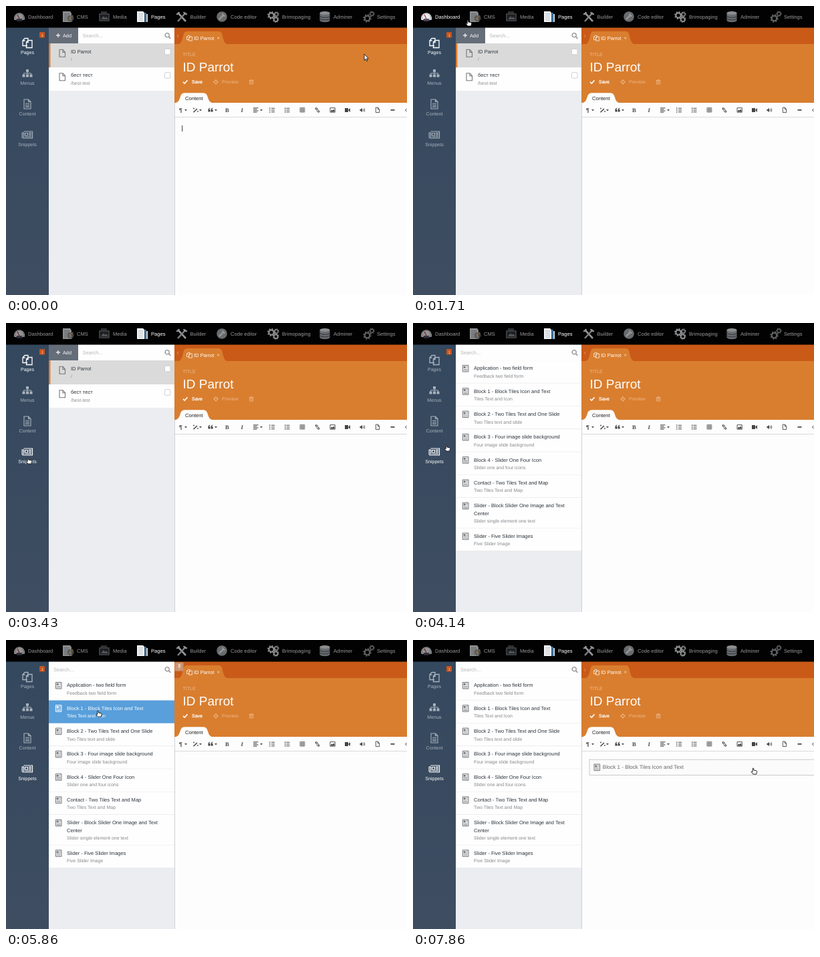
These frames come from a looping animation (600x433 px, 8000 ms). An HTML page:

```html
<!DOCTYPE html>
<html lang="en">
<head>
<meta charset="utf-8">
<title>Page editor</title>
<style>
html, body { margin: 0; width: 100%; height: 100%; overflow: hidden; background: #fdfdfd; }
svg { display: block; width: 100%; height: 100%; }
text { font-family: "Liberation Sans", Arial, sans-serif; text-rendering: geometricPrecision; white-space: pre; }
.serif { font-family: "Liberation Serif", serif; font-weight: bold; }
</style>
</head>
<body>
<svg id="stage" viewBox="0 0 600 433"></svg>
<script>
const stage = document.getElementById('stage');
const LOOP = 8000, STEPS = 7; // picture steps per second

const rect = (x, y, w, h, fill, more = '') =>
  `<rect x="${x}" y="${y}" width="${w}" height="${h}" fill="${fill}" ${more}/>`;
const text = (x, y, size, fill, s, more = '') =>
  `<text x="${x}" y="${y}" font-size="${size}" fill="${fill}" ${more}>${s}</text>`;
const line = (d, color = 'currentColor', w = 1, more = '') =>
  `<path d="${d}" fill="none" stroke="${color}" stroke-width="${w}" ${more}/>`;
const shape = (d, fill = 'currentColor', more = '') => `<path d="${d}" fill="${fill}" ${more}/>`;
const disc = (x, y, r, fill, more = '') => `<circle cx="${x}" cy="${y}" r="${r}" fill="${fill}" ${more}/>`;
const at = (x, y, body, more = '', scale = 1) =>
  `<g transform="translate(${x} ${y}) scale(${scale})" ${more}>${body}</g>`;

const gear = (x, y, r, color) => at(x, y,
  disc(0, 0, r * .62, 'none', `stroke="${color}" stroke-width="${r * .36}"`) +
  disc(0, 0, r * .88, 'none', `stroke="${color}" stroke-width="${r * .3}" stroke-dasharray="${r * .345}"`));
const page = (x, y, w, h, color, lw = 1) =>
  at(x, y, line(`M0 0H${w * .6}L${w} ${h * .35}V${h}H0ZM${w * .58} 0V${h * .37}H${w}`, color, lw));
const news = color => line('M-4.3-4.8H4.3V4.8H-4.3Z', color, 1) +
  shape('M-3-3.4H0V-.4H-3ZM1-3.4H3V-2.6H1ZM1-1.5H3V-.7H1ZM-3 .7H3V1.5H-3ZM-3 2.6H3V3.4H-3Z', color);
const lens = (x, y) => at(x, y, disc(-.8, -.8, 3.1, 'none', 'stroke="#8b8f95" stroke-width="1.3"') + line('M1.5 1.5L4.3 4.3', '#8b8f95', 1.6));

// Top menu: label, label x, icon x, icon
const menu = [
  ['Dashboard', 33, 20, shape('M-7.5 5A8 8 0 1 1 7.5 5Z', '#e9edf0') +
    disc(0, 1, 6.2, 'none', 'stroke="#667" stroke-width="1.6" stroke-dasharray=".8 1.6"') + line('M0 3L-3-3', '#c33', 1.2) + shape('M-4 3H4V6H-4Z', '#556')],
  ['CMS', 106, 93, shape('M-8-8H3L5-5V8H-8Z', '#dfe3e6') + line('M-6-4H2M-6-1H2M-6 2H1M-6 5H0', '#8b959c') +
    gear(3.5, 2.5, 5, '#7f8a92') + line('M0 6L7-2', '#d09a52', 1.8)],
  ['Media', 160, 147, rect(-8, -5, 16, 12, '#5c5f63', 'rx="1"') + rect(-5, -8, 9, 3, '#484b4f') +
    rect(-6, -3, 12, 8, '#2d3035') + shape('M-5 4L-1-1L1 2L3 0L6 4Z', '#83888d')],
  ['Pages', 217, 204, shape('M-8-8H1L3-6V8H-8Z', '#f4f6f8') + line('M-6-4H1M-6-1H1M-6 2H1M-6 5H1', '#aab4bc') +
    rect(3.5, -6, 2, 14, '#4b8fc9') + rect(6, -4, 2, 12, '#cfd8df')],
  ['Builder', 275.5, 263, line('M-6-6L6 7', '#eef0f2', 2.6) + line('M6-6L-6 7', '#c9ced3', 2.4) +
    line('M-8-4Q-5-3-4-7M3-7Q4-3 8-4', '#eef0f2', 2)],
  ['Code editor', 336, 323, disc(0, 0, 7.8, '#a9adb1') + line('M-4 4L3-3', '#f5f5f5', 2.4) + line('M1-5Q1-1 5-1', '#f5f5f5', 1.7)],
  ['Brimopaging', 413, 400, gear(-3, -2, 5.8, '#e8eaec') + gear(4.6, -3.6, 4, '#d5d9dc') + gear(3.7, 4.2, 4.6, '#e8eaec')],
  ['Adminer', 490, 477, shape('M-7.5-5.5V5.5A7.5 2.8 0 0 0 7.5 5.5V-5.5Z', '#a9afb5') +
    '<ellipse cy="-5.5" rx="7.5" ry="2.6" fill="#e2e5e8"/>' + line('M-7.5-1.5A7.5 2.8 0 0 0 7.5-1.5M-7.5 2A7.5 2.8 0 0 0 7.5 2', '#555c63', 1.1)],
  ['Settings', 555, 543, gear(-2.5, 2.5, 6, '#9a9da0') + gear(4.4, -4.2, 4.1, '#9a9da0')],
];
const menuEdges = menu.slice(1).map(m => m[2] - 9);

const sideItems = [
  ['Pages', line('M-3.5-3H-7V4.5H0M-7-3L-4-6.5H1V-3M-1.5-1L1-3.5H7V7.5H-1.5ZM1-3.5V-.5H-1.5', 'currentColor', 1.3)],
  ['Menus', shape('M-2-6H2V-2H-2ZM-7.5 1.5H-3.5V5.5H-7.5ZM-2 1.5H2V5.5H-2ZM3.5 1.5H7.5V5.5H3.5Z') + line('M0-2V1.5M-5.5 1.5V-.2H5.5V1.5')],
  ['Content', line('M-5-7H1.5L5-3.5V7H-5ZM1.5-7V-3.5H5M-3-.7H3M-3 1.7H3M-3 4.1H3', 'currentColor', 1.1)],
  ['Snippets', line('M-5.5-5H7.5V5H-6.5Q-7.8 5-7.8 3.5V-3H-5.5V4', 'currentColor', 1.2) +
    line('M-3.5-2.5H.5V1H-3.5ZM2-2.6H6M2-.8H6M2 1H6M-3.5 3H6', 'currentColor', 1.1)],
];

const snippets = [
  ['Application - two field form', 'Feedback two field form'],
  ['Block 1 - Block Tiles Icon and Text', 'Tiles Text and Icon'],
  ['Block 2 - Two Tiles Text and One Slide', 'Two Tiles text and slide'],
  ['Block 3 - Four image slide background', 'Four image slide background'],
  ['Block 4 - Slider One Four Icon', 'Slider one and four icons'],
  ['Contact - Two Tiles Text and Map', 'Two Tiles Text and Map'],
  ['Slider - Block Slider One Image and Text|Center', 'Slider single element one text'],
  ['Slider - Five Slider Images', 'Five Slider Image'],
];
let rowTop = 56.2;
const rows = snippets.map(([title, sub]) => {
  const lines = title.split('|'), y = rowTop, h = 34.3 + (lines.length - 1) * 11.3;
  rowTop += h;
  return { lines, sub, y, h };
});

const drawMenu = () => rect(0, 0, 600, 32.5, '#020202') + menu.map(([label, x, ix, icon]) =>
  `<g class="menu">${at(ix, 16, icon)}${text(x, 18.8, 7.6, 'currentColor', label)}</g>`).join('');

const drawSide = () => rect(0, 32, 64, 401, 'url(#side)') + sideItems.map(([label, icon], i) =>
  `<g class="side">${at(32, 55 + 46 * i, icon)}${text(32, 71.7 + 46 * i, 7.1, 'currentColor', label, 'text-anchor="middle"')}</g>`).join('') +
  rect(50, 39, 8, 8.6, '#c9541d', 'rx="1"') + text(52.6, 45.6, 6, '#f6d5c4', '1');

const pageRow = (y, title, path) => page(80, y + 9, 8.5, 11, '#777', 1.1) +
  text(97, y + 14.4, 7.6, '#2c333b', title) + text(97, y + 26, 7, '#8f8f8f', path) +
  rect(237.5, y + 8, 8.5, 8.5, '#fff', 'rx="1" stroke="#c4c6c8" stroke-width=".8"');

const drawPages = () => '<g id="pages">' +
  rect(64, 32, 44, 24, '#656d79') + line('M75 44H81M78 41V47', '#e6e8ea', 1.4) + text(85, 47, 7.3, '#fff', 'Add') +
  text(114.5, 46.8, 7.6, '#b4b6b9', 'Search...') +
  rect(64, 56, 188, 36, '#dadada') + rect(64, 56, 2.4, 36, '#e07b2c') + rect(64, 92, 188, 35, '#fefefe') +
  pageRow(56.3, 'ID Parrot', '/') + pageRow(91.7, 'бест тест', '/best-test') + '</g>';

const drawRow = ({ lines, sub, y, h }) => '<g class="row">' +
  rect(64, y, 188, h, '#fefefe') + rect(64, y + h - .7, 188, .7, '#e6e7e9', 'class="rule"') +
  rect(64, y, 188, h, '#589fdb', 'class="glow"') +
  at(78.7, y + 12, news('currentColor'), 'class="mark"') +
  `<g class="title">${lines.map((s, i) => text(91, y + 14.2 + i * 11.3, 7.55, 'currentColor', s)).join('')}</g>` +
  `<g class="sub">${text(91, y + h - 8.6, 7, 'currentColor', sub)}</g></g>`;

const drawSnippets = () => '<g id="snippets">' + text(71, 46.8, 7.6, '#b4b6b9', 'Search...') + rows.map(drawRow).join('') + '</g>';

const drawHeader = () => rect(252, 32, 348, 25.3, '#c95a18') + rect(252, 57, 348, 88, '#d97e2f') +
  shape('M257 57.5Q262 57 264 49L265.5 43Q266.5 38 271 38H318Q322.5 38 323.5 43L325 49Q327 57 332 57.5Z', '#d97e2f') +
  line('M258 43L256.5 45L258 47', '#e09a6a', .9) + at(274.5, 48, sideItems[0][1], 'color="#fff"', .56) +
  text(281, 50.8, 7.6, '#fff', 'ID Parrot') + disc(317.7, 48, 1.8, '#e7ab78') +
  text(264.5, 75.3, 7, '#eebd91', 'TITLE') + text(264.5, 97.8, 19, '#fff', 'ID Parrot') +
  line('M265 113.8L267.3 116L271.5 111.3', '#fff', 1.6) + text(278, 116.3, 7, '#fff', 'Save', 'stroke="#fff" stroke-width=".25"') +
  disc(314, 113.8, 2.4, 'none', 'stroke="#edb788" stroke-width="1"') +
  line('M314 110V112.5M314 115V117.6M310.2 113.8H312.7M315.3 113.8H317.8', '#edb788', 1) +
  text(323, 116.3, 7, '#edb788', 'Preview') +
  line('M364.5 112H369.8V117H364.5ZM363.6 111.6H370.6M366 110.5H368.3M366.3 113V116M368 113V116', '#edb788', .8);

const arrow = x => shape(`M${x - 2} 155H${x + 2}L${x} 157.2Z`, ink);
const bars = (x, w) => `M${x} 153.2h${w}M${x} 156h${w}M${x} 158.8h${w}`;
const ink = '#444';
const drawToolbar = () => rect(252.9, 145, 348, 21, '#fdfdfd') + rect(252.9, 166, 348, 1, '#d9dadc') +
  shape('M253 145.2Q258.5 144.5 260.3 137.5Q261.8 130.2 267 130.2H295.5Q300.5 130.2 302.2 137.5Q304 144.5 309 145.2Z', '#fdfdfd') +
  text(268, 141.3, 7.6, '#222', 'Content') +
  text(259, 158.8, 8.5, ink, '¶', 'font-weight="bold"') +
  line('M280.5 159.3L286 154', ink, 1.5) + line('M281 152.4V154.6M280 153.5H282M287 157V159M286 158H288', ink, .8) +
  shape('M302.5 156Q302.5 153 305.3 152.5V153.6Q304 154 304.1 155.2H305.5V158.5H302.5ZM306.6 156Q306.6 153 309.4 152.5V153.6Q308.1 154 308.2 155.2H309.6V158.5H306.6Z', ink) +
  [269, 291, 314, 382].map(arrow).join('') +
  text(328, 159, 8.5, ink, 'B', 'class="serif"') + text(351.5, 159, 8.5, ink, 'I', 'class="serif" font-style="italic"') +
  line('M370 152.8H377.5M370 154.9H375.5M370 157H377.5M370 159.1H375.5', ink, 1) +
  line(bars(397, 5), ink, 1.1) + line('M394.8 152V154.4M394.8 155V157M394.8 157.8V160', ink, .9) +
  line(bars(419.5, 5), ink, 1.1) + line(bars(417, 1.4), ink, 1.4) +
  line('M440 152.5H446.8V159H440ZM440 154.7H446.8M440 156.9H446.8M442.3 153V159M444.5 153V159', ink, .7) +
  line('M465.2 156.2L463.3 154.2Q462.8 153.2 463.8 152.8Q465 152.5 466.8 155M466.4 155.6L468.6 157.6Q469 158.8 467.8 159.2Q466.6 159 465 157', ink, 1.1) +
  line('M485 152.6H492.3V159.2H485Z', ink, .9) + shape('M486 158.5V157L487.5 155.5L488.7 156.8L490.2 154.5L491.5 156.3V158.5Z', ink) +
  shape('M507 153H512V159H507ZM512.4 155.5L515 153V159L512.4 156.5Z', ink) +
  shape('M529.5 154.8H531L533 152.8V159.2L531 157.2H529.5Z', ink) + line('M534.3 154.6Q535.4 156 534.3 157.4M535.8 153.2Q537.8 156 535.8 158.8', ink, .9) +
  page(553.3, 152, 5.3, 7.6, ink, .9) + rect(575.5, 155, 6, 1.7, ink) + line('M599.5 153.8L597.5 156L599.5 158.2', ink, 1);

const drawInsert = () => '<g id="insert">' +
  rect(264, 179.2, 350, 23.3, '#fbfbfb', 'stroke="#8c8c8c" stroke-width=".8" stroke-dasharray="1.2 1"') +
  at(275.3, 190.8, news('#777')) + text(283.8, 193.4, 8, '#666', 'Block 1 - Block Tiles Icon and Text') + '</g>';

const drawPin = () => '<g id="pin">' + rect(252.5, 33.5, 13, 13, '#cb9472') +
  shape('M257.3 36H261.3V37H260.7V39.4L262 41H256.6L257.9 39.4V37H257.3ZM258.9 41H259.7V44H258.9Z', '#e6cdbb') + '</g>';

const drawCursor = () => '<g id="cursor">' +
  shape('M0 0V9.3L2.1 7.4L3.6 10.6L5 9.9L3.6 6.9H6.4Z', '#fff', 'id="arrow" stroke="#111" stroke-width=".9"') +
  shape('M-.8.4Q0-.4.8.4V3L5 3.8Q5.8 4.2 5.6 5.4L4.8 9H-.2L-2.8 5.6Q-2.6 4.6-1.7 5L-.8 5.7Z', '#fff', 'id="hand" stroke="#111" stroke-width=".9"') + '</g>';

stage.innerHTML =
  '<defs><linearGradient id="side" x2="0" y2="1"><stop stop-color="#34485e"/><stop offset="1" stop-color="#3f4d61"/></linearGradient></defs>' +
  rect(0, 0, 600, 433, '#fdfdfd') + rect(64, 32, 188, 401, '#ebedf1') + rect(64, 32, 188, 24, '#fefefe') +
  drawPages() + drawSnippets() + lens(242, 44.5) + rect(252, 33, .9, 400, '#c8cbd0') +
  drawSide() + drawHeader() + drawToolbar() + drawPin() +
  drawInsert() + rect(263.3, 179, .9, 9, '#222', 'id="caret"') + drawMenu() + drawCursor();

const all = q => [...stage.querySelectorAll(q)];
const id = name => document.getElementById(name);
const show = (el, on) => el.setAttribute('display', on ? 'inline' : 'none');
const menuEls = all('.menu'), sideEls = all('.side'), rowEls = all('.row');

// Pointer path: step, x, y
const path = [[0, 536, 72], [3, 536, 72], [6, 420, 19], [10, 50, 18], [11, 64, 20], [12, 82, 21], [15, 40, 58],
  [19, 33, 150], [22, 33, 202], [26, 33, 202], [29, 50, 183], [32, 105, 105], [34, 130, 76], [37, 130, 76],
  [39, 135, 104], [43, 140, 108], [45, 200, 140], [46, 308, 146], [49, 425, 178], [52, 495, 190], [55, 509, 192]];
const OPEN = 26, INSERT = 43, CARET_OFF = 4;

function pointer(step) {
  step = Math.max(0, step);
  let i = 1;
  while (i < path.length - 1 && path[i][0] < step) i++;
  const [s0, x0, y0] = path[i - 1], [s1, x1, y1] = path[i];
  const k = Math.min(1, (step - s0) / (s1 - s0));
  return [x0 + (x1 - x0) * k, y0 + (y1 - y0) * k];
}

function hit([x, y], open) {
  if (y < 33) return { menu: menuEdges.filter(e => x >= e).length };
  if (x < 64) return { side: Math.floor((y - 36) / 46) };
  if (x < 252) return { panel: true, row: open ? rows.findIndex(r => y >= r.y && y < r.y + r.h) : -1 };
  return {};
}

function draw(time) {
  const step = Math.floor((time % LOOP + 5) * STEPS / 1000) % (LOOP * STEPS / 1000);
  const open = step >= OPEN, inserted = step >= INSERT;
  const pos = pointer(step), now = hit(pos, open);
  const hover = hit(pointer(step - 1), open); // highlights trail the pointer by a step

  menuEls.forEach((el, i) => {
    const on = i === 3 || i === hover.menu;
    el.setAttribute('color', on ? '#fff' : '#999');
    el.firstChild.setAttribute('opacity', on ? 1 : .62);
  });
  sideEls.forEach((el, i) =>
    el.setAttribute('color', i === (open ? 3 : 0) || i === hover.side ? '#fff' : '#a9b3be'));
  rowEls.forEach((el, i) => {
    const on = i === hover.row;
    show(el.querySelector('.glow'), on);
    for (const [part, color] of [['mark', '#707274'], ['title', '#2c333b'], ['sub', '#85878a']])
      el.querySelector('.' + part).setAttribute('color', on ? '#fff' : color);
  });

  show(id('pages'), !open);
  show(id('snippets'), open);
  show(id('pin'), hover.panel);
  show(id('insert'), inserted);
  show(id('caret'), step < CARET_OFF);

  const onInsert = inserted && pos[0] > 264 && pos[1] > 179 && pos[1] < 203;
  const hand = now.menu >= 0 || now.side >= 0 || now.row >= 0 || onInsert;
  show(id('hand'), hand);
  show(id('arrow'), !hand);
  id('cursor').setAttribute('transform', `translate(${pos[0].toFixed(1)} ${pos[1].toFixed(1)})`);
}

const start = performance.now();
function tick() {
  draw(performance.now() - start);
  requestAnimationFrame(tick);
}
tick();
</script>
</body>
</html>
```
